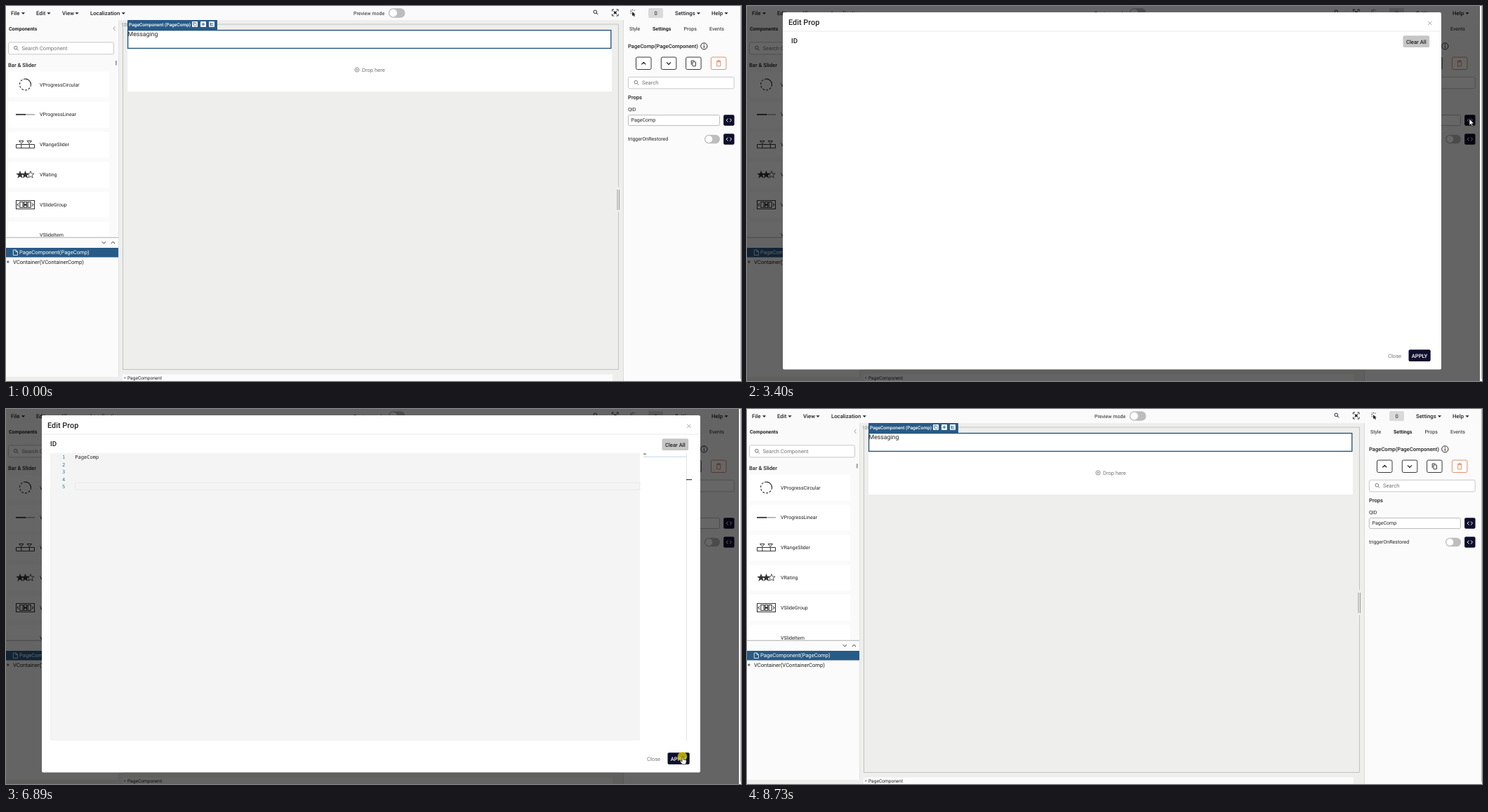
These frames come from a looping animation (1047x535 px, 9.2 s). An HTML page:

```html
<!DOCTYPE html>
<html lang="en">
<head>
<meta charset="utf-8">
<title>Page editor</title>
<style>
html, body { margin: 0; width: 100%; height: 100%; overflow: hidden; background: #eeeeec; }
svg { display: block; width: 1047px; height: 535px; }
text { font: 7.64px Roboto, sans-serif; fill: #222; text-rendering: geometricPrecision; white-space: pre; }
.menu { font-size: 7.75px; font-weight: 500; }
.s7 { font-size: 7.05px; }
.s6 { font-size: 6.6px; }
.m { font-weight: 500; }
.b { font-weight: 700; }
.mono { font: 7.1px "Noto Sans Mono", monospace; }
.num { fill: #237893; text-anchor: end; }
.grey { fill: #757575; }
.white { fill: #fff; }
.mid { text-anchor: middle; }
.line { fill: none; stroke: #222; stroke-width: 1; }
.navy { fill: #0f0f2d; }
</style>
</head>
<body>
<svg viewBox="0 0 1047 535">
  <defs>
    <clipPath id="list"><rect y="78" width="160" height="251"/></clipPath>
    <filter id="shade" x="-10%" y="-30%" width="120%" height="160%"><feDropShadow dx="0" dy=".6" stdDeviation="2.2" flood-opacity=".22"/></filter>
    <path id="star" d="M0-6 1.5-1.9 5.8-1.8 2.4.9 3.6 5 0 2.6-3.6 5-2.4.9-5.8-1.8-1.5-1.9Z"/>
    <g id="copy" fill="none" stroke="currentColor" stroke-width=".9"><rect x="-1.6" y="-2" width="4.6" height="6" rx=".5"/><path d="M-3.3 2V-3.8H1.3"/></g>
    <g id="lens" fill="none" stroke="currentColor"><circle cx="-.7" cy="-.7" r="2.3"/><path d="M1 1 3.3 3.3"/></g>
    <g id="code"><rect x="-7.7" y="-7.8" width="15.4" height="15.6" rx="2" class="navy"/><path d="M-1.3-2.4-3.7 0-1.3 2.4M1.3-2.4 3.7 0 1.3 2.4" fill="none" stroke="#fff"/></g>
    <g id="toggle"><rect x="-11" y="-6.3" width="22" height="12.6" rx="6.3" fill="#bdbdbd"/><circle cx="-4.7" r="5" fill="#fff"/></g>
  </defs>

  <!-- workspace -->
  <rect width="1047" height="535" fill="#eeeeec"/>
  <text x="164" y="28.5" class="s6 grey">120</text>
  <path d="M301 26H872.5V258M872.5 294V518.5H166.5V26H173" fill="none" stroke="#c2c2c2"/>
  <path d="M871 262V291M873.5 262V291" stroke="#999" stroke-width="1"/>
  <rect x="173" y="34" width="690" height="88" fill="#fff"/>
  <rect x="173.6" y="34.6" width="688.2" height="25.8" fill="none" stroke="#245680" stroke-width="1.4"/>
  <text x="173.6" y="43.4" style="font-size:8.73px">Messaging</text>
  <circle cx="500" cy="91" r="3.1" fill="none" stroke="#777" stroke-width=".8"/>
  <path d="M498.5 91H501.5M500 89.5V92.5" stroke="#777" stroke-width=".8"/>
  <text x="507" y="93.7" class="grey">Drop here</text>
  <path d="M173 34V21Q173 19.5 174.5 19.5H299.5Q301 19.5 301 21V34Z" fill="#285a86"/>
  <text x="175" y="29" class="s6 m white">PageComponent (PageComp)</text>
  <g fill="#fff"><rect x="265" y="22" width="8" height="8" rx="1"/><rect x="277" y="22" width="8" height="8" rx="1"/><rect x="289" y="22" width="8" height="8" rx="1"/></g>
  <use href="#copy" transform="translate(269 26) scale(.7)" color="#285a86"/>
  <path d="M278.5 26H283.5M281 23.5V28.5M291 23.5V28H295.5M291 25.5H295" fill="none" stroke="#285a86"/>
  <rect x="166" y="525.5" width="698" height="9.5" fill="#fbfbfb"/>
  <path d="M168.5 529 171 530.5 168.5 532Z" fill="#888"/>
  <text x="173" y="533" class="s6">PageComponent</text>

  <!-- top bar -->
  <rect width="1047" height="20" fill="#fafafa"/>
  <g id="menus"></g>
  <text x="495" y="12.7" class="s7">Preview mode</text>
  <use href="#toggle" transform="translate(556.7 10) scale(1.08)"/>
  <use href="#lens" x="840" y="9" color="#222"/>
  <path class="line" d="M863.5 7.5V5H866M869.5 5H872V7.5M872 11.5V14H869.5M866 14H863.5V11.5"/>
  <path class="line" d="M865.5 7 870 12M870 7 865.5 12"/><circle cx="867.8" cy="9.5" r="1.8" fill="#222"/>
  <path d="M892 8.2V14.2L893.4 12.9 894.8 15 896 14.3 894.7 12.3H896.8Z" fill="#222"/>
  <path class="line" d="M889.5 8H891M892.7 4.8V6.2M895.7 5.5 894.7 6.7M889.8 11.2 891 10.2M890 5.3 891 6.5"/>
  <rect x="915" y="3" width="21" height="14" rx="2" fill="#d9d9d9"/>
  <text x="925.7" y="12.9" class="mid">0</text>

  <!-- component list -->
  <rect y="20" width="160" height="509" fill="#fafafa"/>
  <path d="M160.5 20V529" stroke="#e2e2e2"/>
  <text x="4" y="34.7" class="s7 b">Components</text>
  <path d="M155.5 29 153 32 155.5 35" fill="none" stroke="#888" stroke-width=".8"/>
  <rect x="3.5" y="51.8" width="150" height="17" rx="2" fill="#fff" stroke="#bbb" stroke-width=".8"/>
  <use href="#lens" x="14.5" y="60.3" color="#777"/>
  <text x="22.5" y="63" class="grey">Search Component</text>
  <rect x="155.7" y="78" width="2.3" height="6.5" fill="#aaa"/>
  <g clip-path="url(#list)">
    <text x="3" y="87.4" class="m">Bar &amp; Slider</text>
    <g id="cards"></g>
    <g fill="none" stroke="#333">
      <path d="M27.5 104A8 8 0 0 1 35.5 112" stroke-width="1.3"/>
      <path d="M35.5 112A8 8 0 1 1 27.5 104" stroke-width="1.1" stroke-dasharray="3 2"/>
      <path d="M27 154.8H41" stroke="#aaa" stroke-width="1.6"/><path d="M14 154.8H28" stroke-width="1.8"/>
      <path d="M14.5 197.5H40.5V202.7H14.5ZM18.5 192.5H25L21.8 196.3ZM30 192.5H36.5L33.3 196.3ZM21.8 197V203M33.3 197V203"/>
      <use href="#star" x="20" y="240.7" fill="#333" stroke="none"/><use href="#star" x="27.5" y="240.7" fill="#333" stroke="none"/>
      <use href="#star" transform="translate(35 240.7) scale(.88)" stroke-width=".9"/>
      <path d="M14.5 277.5H40.5V289.5H14.5ZM19.8 279.5H24V287.5H19.8ZM25.6 279.5H29.6V287.5H25.6ZM31.2 279.5H35.2V287.5H31.2ZM18 281.5 16.2 283.5 18 285.5M37 281.5 38.8 283.5 37 285.5" stroke-width="1.1"/>
      <path d="M26 283.5H29" stroke-width="2.6"/>
    </g>
  </g>

  <!-- tree -->
  <rect y="330" width="160" height="199" fill="#fbfbfb"/>
  <path d="M0 330.3H160" stroke="#aaa" stroke-width=".9"/>
  <path class="line" d="M136.8 336.3 139.4 338.9 142 336.3M149.8 338.9 152.4 336.3 155 338.9"/>
  <rect y="345" width="160" height="13.5" fill="#285a86"/>
  <path d="M10.3 348H14.2L16.4 350.2V355.5H10.3ZM14 348V350.5H16.4" fill="none" stroke="#fff" stroke-width=".8"/>
  <text x="19" y="354.3" class="white">PageComponent(PageComp)</text>
  <path d="M1 365H4.6M2.8 363.2V366.8" stroke="#222" stroke-width=".8"/>
  <text x="10" y="368">VContainer(VContainerComp)</text>

  <!-- inspector -->
  <rect x="880" y="20" width="167" height="515" fill="#fbfbfb"/>
  <path d="M879.5 20V535" stroke="#dcdcdc"/>
  <text x="888" y="34.7" class="s7">Style</text>
  <text x="921" y="34.7" class="s7 b">Settings</text>
  <text x="965.5" y="34.7" class="s7">Props</text>
  <text x="1002" y="34.7" class="s7">Events</text>
  <text x="886" y="59.8" class="m">PageComp(PageComponent)</text>
  <circle cx="994.3" cy="57.3" r="4.6" class="line" stroke-width=".8"/>
  <path d="M994.3 56.2V60M994.3 54V55.2" stroke="#222"/>
  <g fill="#fff" stroke="#222" stroke-width=".9">
    <rect x="897.5" y="73" width="21.5" height="17.5" rx="2"/><rect x="933.3" y="73" width="21.5" height="17.5" rx="2"/>
    <rect x="968.6" y="73" width="21.5" height="17.5" rx="2"/><rect x="1004.4" y="73" width="21.5" height="17.5" rx="2" stroke="#e0805f"/>
  </g>
  <path d="M905.3 83.4 908.3 80.4 911.3 83.4M941 80.4 944 83.4 947 80.4" fill="none" stroke="#222" stroke-width="1.3"/>
  <use href="#copy" x="979.5" y="81.8" color="#222"/>
  <path d="M1012.7 79.8H1017.6V85.8H1012.7ZM1011.8 78.5H1018.5M1014 77.6H1016.3" fill="none" stroke="#e0805f" stroke-width=".9"/>
  <rect x="886.4" y="101.3" width="150.8" height="16.6" rx="2" fill="#fff" stroke="#bbb" stroke-width=".8"/>
  <use href="#lens" x="898" y="109.4" color="#777"/>
  <text x="906" y="112.2" class="grey">Search</text>
  <text x="886" y="133" class="m">Props</text>
  <text x="886" y="149.6" class="s7">QID</text>
  <rect x="886.4" y="155.6" width="130" height="15" rx="2" fill="#fff" stroke="#aaa" stroke-width=".8"/>
  <text x="890.5" y="165.4" class="s7">PageComp</text>
  <path id="squiggle" d="M890.5 166.6H925" stroke="#e33" stroke-width=".9"/>
  <use href="#code" x="1029.8" y="163"/>
  <text x="886" y="192.3" class="s7">triggerOnRestored</text>
  <use href="#toggle" x="1006" y="190"/>
  <use href="#code" x="1029.8" y="190"/>
  <path d="M1046.4 0V532" stroke="#b5b5b5" stroke-width="1"/>

  <!-- dialog -->
  <g id="dialog">
    <rect width="1044" height="535" opacity=".6"/>
    <rect x="51" y="9" width="938" height="509.5" rx="2" fill="#fff"/>
    <path d="M51 36H989" stroke="#e4e4e4" stroke-width=".8"/>
    <text x="59" y="26.5" class="m" style="font-size:10.9px">Edit Prop</text>
    <path d="M970.2 21.8 975.4 27M975.4 21.8 970.2 27" stroke="#999" stroke-width=".9"/>
    <text x="63" y="53" class="m" style="font-size:9.8px">ID</text>
    <rect x="934.5" y="42.3" width="37.6" height="16.7" rx="2" fill="#c6c6c6"/>
    <text x="953.3" y="53.5" class="m mid">Clear All</text>
    <text x="913" y="502" class="grey">Close</text>
    <rect x="942.5" y="490.3" width="31.2" height="16.8" rx="2" class="navy"/>
    <text x="958" y="502" class="m white mid">APPLY</text>
    <g id="editor">
      <rect x="63" y="63" width="840" height="410" fill="#f4f4f4"/>
      <rect id="row" x="98.3" width="804.7" height="10" fill="none" stroke="#e6e6e6" stroke-width=".8"/>
      <text x="98.3" y="71.3" class="mono">PageComp</text>
      <g id="nums"></g>
      <rect id="caret" width="1" height="10.5"/>
      <path d="M908 64.2H912" stroke="#555" stroke-width="1.1"/>
      <path d="M908 68.2H969" stroke="#b5d3ec" stroke-width=".9"/>
      <path d="M969.5 63V473" stroke="#dcdcdc" stroke-width=".8"/>
      <rect id="tick" x="969" width="8" height="1.1" fill="#222"/>
      <rect id="thumb" x="969" y="63" width="8" fill="#bdbdbd"/>
    </g>
  </g>

  <!-- toast -->
  <g id="toast">
    <rect x="859" y="9" width="162" height="48" rx="3.5" fill="#ff6161" filter="url(#shade)"/>
    <circle cx="879.5" cy="33.4" r="6.5" fill="#1d0b0b"/>
    <path d="M877 30.9 882 35.9M882 30.9 877 35.9" stroke="#ff6161" stroke-width="1.3"/>
    <text x="893" y="28.2" class="m" style="font-size:8.1px">Code Not Saved</text>
    <text x="893" y="41.8" style="font-size:8.2px">Property did not change</text>
    <path d="M1001 30.7 1006.2 35.9M1006.2 30.7 1001 35.9" stroke="#a93c3c" stroke-width=".9"/>
    <rect id="progress" x="859" y="54.2" height="2.8" fill="#fff" opacity=".75"/>
  </g>

  <!-- pointer -->
  <g id="pointer">
    <circle id="click" r="6.8" cy="-.3" cx="-.5" fill="#d8cc00" opacity=".8"/>
    <path id="arrow" d="M0 0V9.3L2.1 7.3 3.6 10.5 5.1 9.8 3.6 6.8H6.5Z" fill="#fff" stroke="#222" stroke-width=".8"/>
    <path id="beam" d="M-2.6-4H-.6Q0-4 0-3.3 0-4 .6-4H2.6M0-3.3V3.3M-2.6 4H-.6Q0 4 0 3.3 0 4 .6 4H2.6" fill="none" stroke="#222" stroke-width=".9"/>
    <path id="hand" d="M-1 .5Q0-.8 1 .5V4L4.5 4.8Q5.6 5.2 5.2 6.8L4.3 11H-.6L-3.6 7.2Q-3.6 5.8-2.4 6L-1 7Z" fill="#fff" stroke="#222" stroke-width=".8"/>
  </g>
</svg>
<script>
const LOOP = 9200;
const $ = id => document.getElementById(id);

const menus = [["File", 7, 24.5], ["Edit", 43, 61], ["View", 80, 101], ["Localization", 120, 167.3], ["Settings", 953, 986.5], ["Help", 1005, 1026]];
$("menus").innerHTML = menus.map(([name, x, tip]) =>
  `<text class="menu" x="${x}" y="12.8">${name}</text><path d="M${tip - 2.6} 9.2h5.2l-2.6 2.7z" fill="#222"/>`).join("");

const cards = ["VProgressCircular", "VProgressLinear", "VRangeSlider", "VRating", "VSlideGroup", "VSlideItem"];
$("cards").innerHTML = cards.map((name, i) => {
  const y = 112 + 42.85 * i;
  return `<rect x="3" y="${y - 18.3}" width="144" height="37" rx="2" fill="#fff"/><text class="s7" x="48" y="${y + 2.5}">${name}</text>`;
}).join("");

const ROW = 10.45;
$("nums").innerHTML = [1, 2, 3, 4, 5].map((n, i) =>
  `<text class="mono num" x="84.3" y="${71.3 + ROW * i}">${n}</text>`).join("");

// time, x, y
const path = [
  [140, 831, 533], [420, 850, 330], [700, 905, 180], [880, 960, 134], [1060, 1029, 146],
  [1110, 1029, 146], [1300, 1038, 150], [1500, 1034, 157], [2030, 921, 162], [2150, 921, 162],
  [2420, 1008, 177.5], [2810, 1029, 161], [3420, 1029, 161], [4160, 214, 80.5], [5780, 214, 80.5],
  [6700, 964, 496], [7000, 964, 496], [7380, 949, 200], [7640, 948, 190], [7720, 948, 190], [8560, 980, 536]
];
const shapes = [[0, "arrow"], [1010, "hand"], [1590, "beam"], [2440, "arrow"], [2700, "hand"], [3340, "arrow"],
  [3640, "beam"], [6560, "arrow"], [6640, "hand"], [7020, "arrow"]];
const clicks = [[2060, 2200], [3300, 3390], [4060, 4160], [6740, 6960]];
const enters = [5100, 5230, 5400, 5520];

const ramp = (t, a, b) => Math.min(1, Math.max(0, (t - a) / (b - a)));
const smooth = k => k * k * (3 - 2 * k);
const within = (t, a, b) => t >= a && t < b;
const set = (id, attrs) => { for (const k in attrs) $(id).setAttribute(k, attrs[k]); };
const show = (id, on) => set(id, { visibility: on ? "inherit" : "hidden" });

function drawPointer(t) {
  const on = within(t, path[0][0], path.at(-1)[0]);
  show("pointer", on);
  if (!on) return;
  const i = path.findIndex(p => p[0] > t);
  const [t0, x0, y0] = path[i - 1], [t1, x1, y1] = path[i];
  const k = smooth(ramp(t, t0, t1));
  set("pointer", { transform: `translate(${x0 + (x1 - x0) * k} ${y0 + (y1 - y0) * k})` });
  const shape = shapes.findLast(s => s[0] <= t)[1];
  for (const id of ["arrow", "beam", "hand"]) show(id, id === shape);
  show("click", clicks.some(([a, b]) => within(t, a, b)));
}

function drawEditor(t) {
  const line = enters.filter(e => e <= t).length;
  [...$("nums").children].forEach((n, i) => n.setAttribute("opacity", i <= line ? 1 : 0));
  show("editor", t >= 3620);
  show("row", t >= 4360);
  set("row", { y: 63.3 + ROW * line });
  const typed = t >= 5100;
  const lit = typed ? t < 5520 || (t - 5520) % 1000 < 500 : within(t, 4360, 4640);
  show("caret", lit && t < 6730);
  set("caret", { x: line ? 98.3 : 132, y: 63.2 + ROW * line });
  show("tick", t >= 4360);
  set("tick", { y: 63 + 9.3 * line });
  set("thumb", { height: 409.5 - 9.4 * line, opacity: typed ? .95 * (1 - ramp(t, 6450, 6700)) : 0 });
}

function draw(t) {
  show("squiggle", within(t, 2090, 3500));
  const open = ramp(t, 3300, 3390) - ramp(t, 6960, 7060);
  show("dialog", open > 0);
  set("dialog", { opacity: open });
  drawEditor(t);

  const enter = smooth(ramp(t, 7000, 7160)), leave = ramp(t, 8560, 8730);
  show("toast", within(t, 7000, 8730));
  set("toast", { opacity: enter * (1 - leave), transform: `translate(${(1 - enter) * 90 + leave * 22} 0)` });
  set("progress", { width: 162 * ramp(t, 8560, 6663) });
  drawPointer(t);
}

const start = performance.now();
function tick() {
  draw((performance.now() - start) % LOOP);
  requestAnimationFrame(tick);
}
tick();
</script>
</body>
</html>
```
